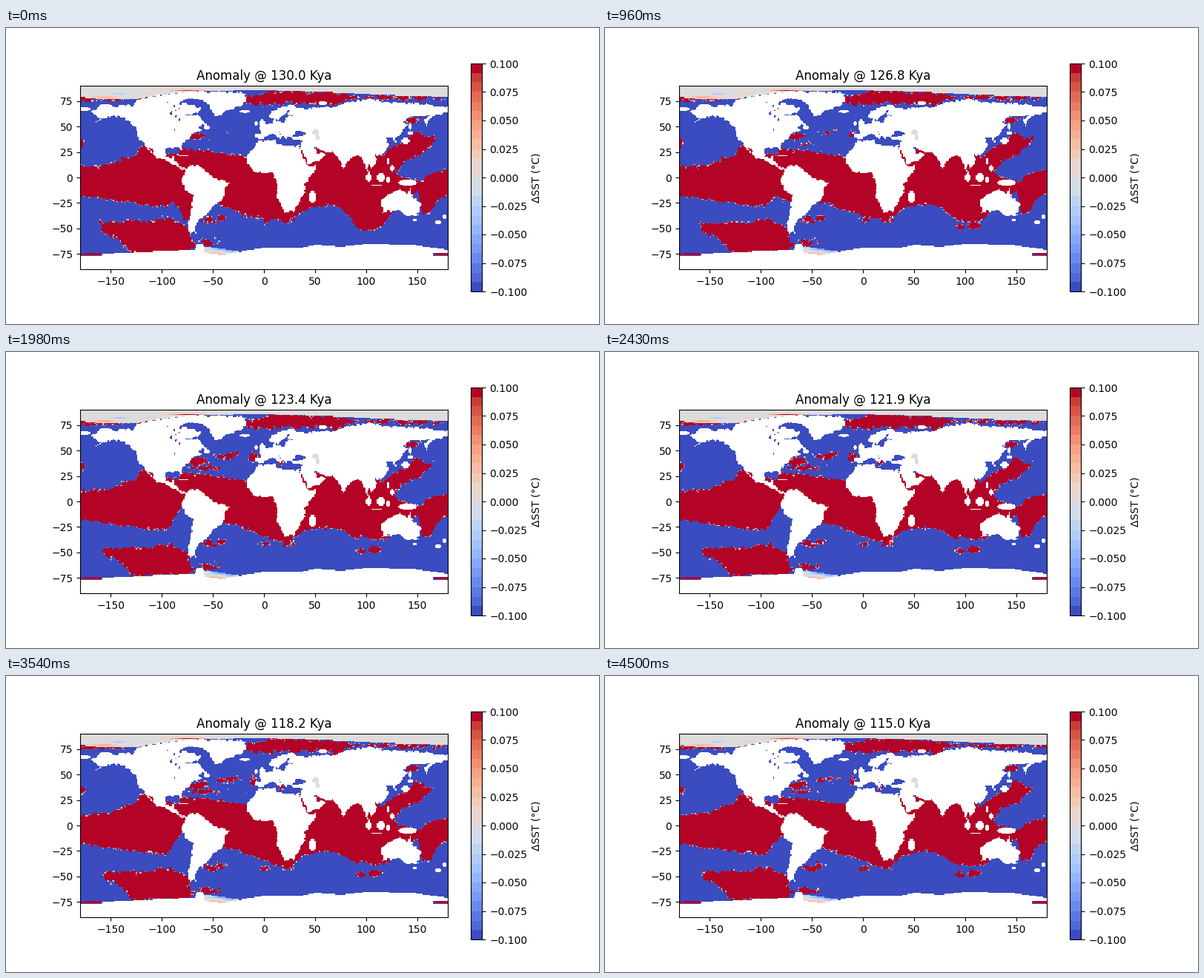
A matplotlib script for the animation above (4.53 s loop, 800 px wide and 400 px high).

```python
import numpy as np
import matplotlib.pyplot as plt
from matplotlib.animation import FuncAnimation
from matplotlib.cm import ScalarMappable
from matplotlib.colors import ListedColormap, Normalize
from matplotlib.path import Path

FRAMES = 151
lon, lat = np.meshgrid(np.arange(-179.5, 180), np.arange(89.5, -90, -1))
rng = np.random.default_rng(8)


def rough():
    """Smooth random field of unit spread."""
    n = rng.normal(size=lon.shape)
    for _ in range(2):
        for axis in (0, 1):
            n = (np.roll(n, 1, axis) + 2 * n + np.roll(n, -1, axis)) / 4
    return n / n.std()


noise = [rough() for _ in range(3)]
# Slightly displaced cells give the coasts a ragged outline
cells = np.column_stack([(lon + 0.6 * noise[1]).ravel(),
                         (lat + 0.6 * noise[2]).ravel()])


def poly(points):
    return Path(points).contains_points(cells).reshape(lon.shape)


def oval(x, y, rx, ry):
    """About the number of cells to the rim, positive inside."""
    return (1 - np.hypot((lon - x) / rx, (lat - y) / ry)) * min(rx, ry)


def most(fields):
    return np.maximum.reduce(list(fields))


def along(points):
    """Latitude of a line through (lon, lat) points."""
    return np.interp(lon, *np.transpose(points))


def bump(x, y, rx, ry, height):
    return height * np.exp(-((lon - x) / rx) ** 2 - ((lat - y) / ry) ** 2)


def depth(mask, reach=12):
    """Cells to the nearest edge, positive inside the mask."""
    def count(m):
        total = np.zeros(m.shape)
        for _ in range(reach):
            total += m
            m = (m & np.roll(m, 1, 0) & np.roll(m, -1, 0)
                 & np.roll(m, 1, 1) & np.roll(m, -1, 1))
        return total
    return count(mask) - count(~mask) - np.where(mask, 0.5, -0.5)


# Coastlines as (lon, lat)
NORTH_AMERICA = [
    (-168, 66), (-157, 71), (-128, 70), (-125, 76), (-105, 80), (-85, 83.5),
    (-70, 84.5), (-62, 83), (-80, 76), (-82, 73.5), (-68, 70), (-62, 67),
    (-65, 63), (-77, 62), (-65, 60), (-56, 53), (-58, 51), (-66, 50),
    (-60, 47), (-70, 43), (-76, 36), (-81, 31.5), (-80, 26), (-84, 30),
    (-97, 29), (-97, 20), (-91, 18.5), (-87, 21.5), (-88, 16), (-83.5, 15),
    (-83, 10), (-77, 8.5), (-80, 7), (-95, 16), (-105, 20), (-109, 26),
    (-113, 31), (-110, 23.5), (-117, 33), (-124, 40), (-124, 48), (-136, 58),
    (-147, 61), (-165, 54.5), (-158, 58), (-166, 62)]
GREENLAND = [
    (-74, 78), (-64, 84), (-30, 84), (-18, 81.5), (-18, 75), (-24, 70),
    (-40, 65), (-43, 60), (-49, 61.5), (-54, 70), (-58, 75)]
SOUTH_AMERICA = [
    (-77, 8.5), (-72, 12), (-62, 10.5), (-50, 0), (-35, -5.5), (-39, -13),
    (-41, -22), (-48, -26), (-57, -37), (-62, -39), (-69, -51), (-66, -55),
    (-72, -54), (-75, -49), (-71, -30), (-70, -18), (-76, -14), (-81, -5),
    (-80, 0)]
AFRICA = [
    (-17, 15), (-17, 21), (-10, 29), (-6, 36), (10, 37), (11, 33), (20, 31),
    (34, 31), (37, 21), (43, 11.5), (51, 12), (48, 5), (39, -7), (40.5, -15),
    (35, -20), (35, -25), (28, -33), (20, -35), (12, -18), (13.5, -10),
    (9, 4), (-8, 4.5)]
EUROPE = [
    (-9, 37), (-9, 43.5), (-2, 43.5), (-5, 48.5), (8, 54), (10, 57.5),
    (11, 54.5), (20, 54.5), (22, 59), (30, 60), (22, 61), (25, 65.5),
    (17, 61), (15, 56), (6, 58.5), (5, 62), (18, 70), (27, 71), (41, 67),
    (54, 69), (67, 69), (67, 40), (41, 41.5), (37, 45), (30, 46), (28, 42),
    (23, 40), (23, 36.5), (13, 45.5), (18, 40), (16, 38), (8, 44), (0, 39)]
ARABIA = [
    (67, 41), (67, 25), (57, 26.5), (48, 30), (51, 24.5), (60, 22.5),
    (52, 16), (44, 12.7), (35, 28.5), (36, 36.5), (28, 36.5), (26, 40),
    (41, 42)]
ASIA = [
    (66, 69), (80, 73), (104, 77.7), (114, 74), (140, 72.5), (180, 69.5),
    (180, 65), (163, 59), (157, 51), (156, 57), (162, 61), (143, 59.5),
    (136, 54.5), (141, 52.5), (132, 43), (128, 39.5), (128, 35), (125, 39),
    (118, 39), (122, 31), (115, 22.5), (108, 21.5), (109, 13), (105, 9),
    (102, 13), (100, 10), (104, 1.5), (98.5, 9), (97, 16.5), (91, 22.5),
    (80, 15), (77.5, 8), (73, 20), (66, 25.3)]
AUSTRALIA = [
    (114, -22), (131, -12), (136, -12), (140, -17.5), (142, -11), (146, -19),
    (153, -26), (150, -37), (140, -38), (131, -31.5), (124, -33.5),
    (115, -35)]
ISLANDS = [
    (-176, 67, 6, 2), (-19, 64.8, 5, 1.5), (-2, 53, 3, 4), (-8, 53, 2, 2),
    (57, 73, 4, 2.5), (-56, 49, 3, 2), (-79, 21.5, 5, 1), (138, 36, 4, 3),
    (142.5, 43.5, 3, 2), (142.5, 50, 1.2, 4), (121, 16, 1.5, 3),
    (125, 9, 2, 3), (114, 0, 4, 4), (102, 0, 3, 4), (110, -7.5, 5, 1),
    (121, -2, 2, 3), (140, -5, 9, 3), (47, -19, 3, 6.5), (147, -42, 2, 1.5),
    (176, -38.5, 2, 2.5), (170, -44, 3, 2)]

# Limits of the warm belt
NORTH = [
    (-180, 10), (-152, 12.5), (-142, 17), (-126, 22), (-122, 30), (-110, 32),
    (-95, 22), (-85, 22), (-80, 30), (-76, 27), (-62, 26.5), (-35, 23),
    (-17, 20), (20, 20), (33, 30), (60, 28), (110, 22), (118, 18), (126, 6),
    (132, 0), (156, -4), (158, 3), (165, 5), (180, 8)]
SOUTH = [
    (-180, -17.5), (-145, -22.5), (-118, -26.5), (-95, -28), (-90, -24),
    (-84, -28), (-78, -42), (-70, -42), (-45, -24), (-30, -32), (-20, -37),
    (5, -41), (24, -43), (30, -38), (42, -31), (65, -26), (78, -33),
    (88, -46), (97, -52), (107, -51), (117, -46), (126, -33), (150, -12),
    (154, -36), (161, -36), (166, -29), (172, -22), (180, -15)]
# How far the southern limit retreats northward
RETREAT = [
    (-100, 0), (-90, 3), (-84, 18), (-78, 40), (-60, 30), (-45, 4), (-25, 11),
    (-10, 8), (20, 2), (42, 4), (65, 0), (78, 4), (97, 17), (117, 9),
    (130, 0), (164, 0), (172, 5), (180, 1)]

EAST_ASIA = [
    (112, 18), (126, 30), (138, 35), (148, 46), (152, 42), (166, 40),
    (166, 34), (152, 21), (137, 16), (128, 2), (112, 5)]
SOUTH_PACIFIC = [
    (-161, -43), (-125, -43), (-93, -40), (-74, -48), (-73, -56), (-68, -66),
    (-75, -75), (-130, -75), (-146, -58), (-160, -53)]
ARCTIC = [
    (-18, 73), (-16, 80), (0, 83), (20, 85), (60, 84), (97, 79), (70, 72),
    (15, 73), (0, 71.5)]
STEADY = [
    (-53, -64, 8, 3), (140, 78, 34, 2.2), (-152, 77, 24, 1.6),
    (-179, 35, 3, 4), (-54, -42, 6, 3), (-42, -40, 4, 2.5), (25, -41, 4, 2),
    (94, -47, 3, 2.5), (108, -47, 5, 3), (145, 56, 5, 2), (-65, 40, 8, 2.7),
    (-84, 65, 5, 3), (-80, 55, 4, 3), (2, -42, 5, 2)]
GROWING = [
    (-66, 39, 11, 3.2), (-55, 33, 14, 1.5), (-40, 44, 8, 2.5),
    (-29, 46, 4, 2), (-10, 43, 4, 5), (17, 37, 4, 2)]

north, south, retreat = along(NORTH), along(SOUTH), along(RETREAT)
shrinking = most(depth(poly(p)) for p in (EAST_ASIA, SOUTH_PACIFIC))
steady = most([depth(poly(ARCTIC))] + [oval(*o) for o in STEADY])
growing = most(oval(*o) for o in GROWING)

# Land, with flecks of open water among the northern islands
coast = along([
    (-180, -77), (-160, -77), (-157, -75), (-100, -72), (-68, -71),
    (-66, -65), (-60, -65), (-58, -74), (-40, -76), (-20, -72), (0, -69),
    (35, -69), (50, -66), (75, -68), (100, -65), (145, -66), (180, -71)])
ross = (lon > 165) & (lat < -73.5) & (lat > -77)
land = most(poly(p) for p in (
    NORTH_AMERICA, GREENLAND, SOUTH_AMERICA, AFRICA, EUROPE, ARABIA, ASIA,
    AUSTRALIA))
land |= (most(oval(*o) for o in ISLANDS) > 0) | (lat < coast) & ~ross
flecks = (oval(-90, 74, 12, 5) > 0) & (noise[0] > 1.1)
bays = (oval(-85, 55, 9, 13) > 0) & (noise[1] > 1.5)
caspian = most([oval(50, 44.5, 3.2, 2.8), oval(51.8, 39.5, 2.2, 3)]) > 0
land &= ~(flecks | bays | caspian)

ice_edge = along([
    (-180, 79), (-165, 77.5), (-125, 77), (-95, 82), (-60, 85), (0, 86),
    (80, 83), (110, 81), (180, 79)])
weddell = (lon > -59) & (lon < -22) & (lat < -68 - (lon + 55) * 0.15)
calm = (lat > ice_edge) | (weddell & (lat < -67.5)) | caspian
tint = sum(bump(*b) for b in [
    (-142, 82, 7, 0.9, -0.04), (-75, 85.5, 16, 0.7, 0.09),
    (-157, 79, 13, 1, 0.04), (-112, 82, 8, 0.8, 0.02),
    (-42, -70, 9, 1.3, -0.06), (-33, -72, 6, 1, -0.05),
    (-50, -75, 8, 0.9, 0.06)])
streak = most([oval(-168, -75.3, 12, 1.1), oval(173, -75, 8, 1)]) > 0


def anomaly(i):
    s = np.interp(i, [0, 19, 46, 66, 97, 118, 150],
                  [0, 0.22, 0.8, 1, 1, 0.92, 0.78])
    a = i * 0.02
    ragged = noise[0] + 0.6 * (noise[1] * np.cos(a) + noise[2] * np.sin(a))
    belt = np.minimum(north - lat, lat - south - s * retreat)
    field = most([belt, shrinking - 2.5 * s, steady, growing - 3 * (1 - s)])
    value = 0.5 * (field + 0.9 * ragged)
    value = np.where(streak, 0.1, value)
    value = np.where(calm, tint * (1 + 0.2 * np.sin(a)), value)
    return np.ma.array(value, mask=land)


# The colour bar shows steps, with a double-width one on each side of zero
smooth = plt.get_cmap("coolwarm")
edges = np.delete(np.linspace(0, 1, 25), [11, 13])
mids = (edges[:-1] + edges[1:]) / 2
mids[0], mids[-1] = 0, 1
steps = np.searchsorted(edges, (np.arange(256) + 0.5) / 256) - 1
stepped = ListedColormap(smooth(mids[steps]))

norm = Normalize(-0.1, 0.1)
fig, ax = plt.subplots(figsize=(8, 4), dpi=100)
image = ax.imshow(anomaly(0), cmap=smooth, norm=norm, interpolation="nearest",
                  extent=(-180, 180, -90, 90))
ax.set_xticks(range(-150, 151, 50))
ax.set_yticks(range(-75, 76, 25))
title = ax.set_title("")
bar = fig.colorbar(ScalarMappable(norm, stepped), ax=ax, label="ΔSST (°C)")
bar.set_ticks(np.linspace(-0.1, 0.1, 9))


def update(i):
    image.set_data(anomaly(i))
    title.set_text(f"Anomaly @ {130 - i / 10:.1f} Kya")
    return image, title


anim = FuncAnimation(fig, update, frames=FRAMES, interval=30, repeat=True)
plt.show()
```
